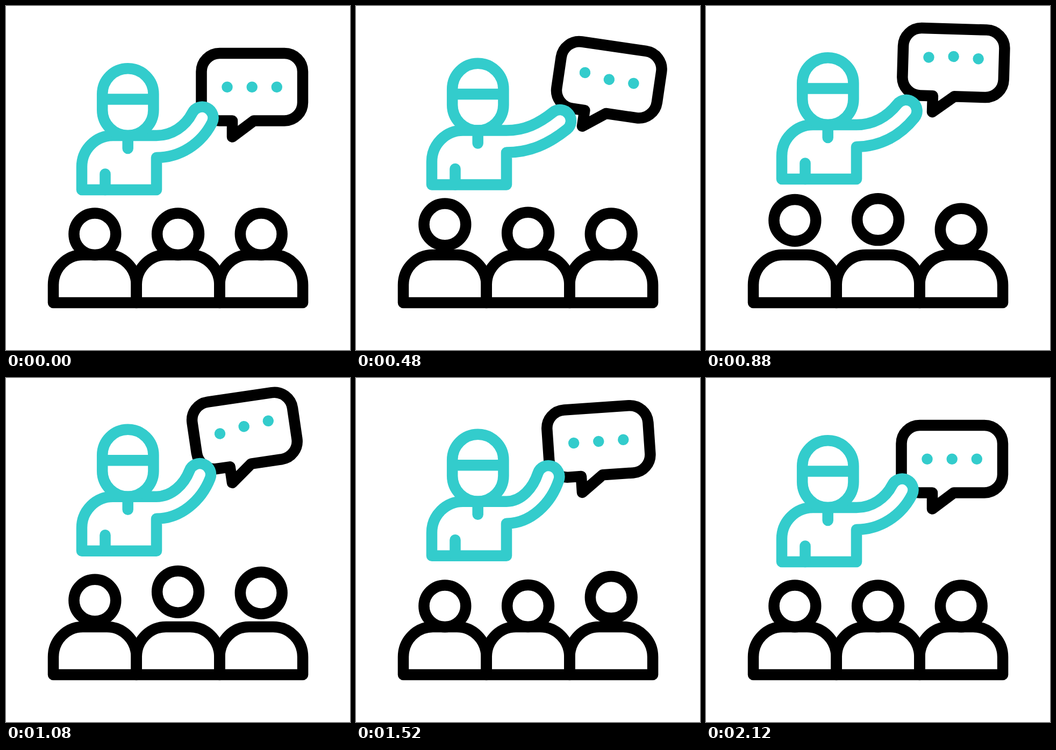
These frames come from a looping animation (640x640 px, 2200 ms). An HTML page:

```html
<!DOCTYPE html>
<html lang="en">
<head>
<meta charset="utf-8">
<title>Lecture</title>
<style>
  html, body { margin: 0; width: 100%; height: 100%; overflow: hidden; background: #fff; }
  svg { display: block; width: 100vw; height: 100vh; }
  .line { fill: none; stroke: #000; stroke-width: 20.5; stroke-linecap: round; stroke-linejoin: round; }
  .teal { stroke: #33cccc; }
  .dot { fill: #33cccc; }
</style>
</head>
<body>
<svg viewBox="0 0 640 640">
  <g id="bubble">
    <path class="line" d="M397.5 88H518a34 34 0 0 1 34 34V179.500a34 34 0 0 1-34 34H461L421 243.500V213.500H397.500a34 34 0 0 1-34-34V122a34 34 0 0 1 34-34Z"/>
    <circle class="dot" cx="411.500" cy="150.700" r="10.250"/>
    <circle class="dot" cx="457.700" cy="150.700" r="10.250"/>
    <circle class="dot" cx="503.800" cy="150.700" r="10.250"/>
  </g>
  <g id="teacher">
    <path id="torso" class="line teal" style="fill:#fff"/>
    <path class="line teal" d="M179.200 163.800a47.600 47.600 0 0 1 95.200 0v29.600a47.600 47.600 0 0 1-95.200 0ZM179.200 173.500h95.200M226.700 241v24M184.500 342v-29.500"/>
  </g>
  <g id="crowd"></g>
</svg>
<script>
const LOOP = 2200, STEP = 40;
const $ = id => document.getElementById(id);
const mix = (a, b, p) => a + (b - a) * p;

// Symmetric ease, cubic-bezier(.5, 0, .5, 1)
function ease(x) {
  let lo = 0, hi = 1;
  for (let i = 0; i < 24; i++) {
    const s = (lo + hi) / 2;
    if (1.5 * s * (1 - s) + s * s * s < x) lo = s; else hi = s;
  }
  return lo * lo * (3 - 2 * lo);
}

// Value at time t on a list of [time, value] keys
function track(t, keys) {
  if (t <= keys[0][0]) return keys[0][1];
  for (let i = 1; i < keys.length; i++) {
    const [t0, a] = keys[i - 1], [t1, b] = keys[i];
    if (t < t1) return mix(a, b, ease((t - t0) / (t1 - t0)));
  }
  return keys[keys.length - 1][1];
}

const hop = (t, mid, half, height) =>
  track(t, [[mid - half, 0], [mid, -height], [mid + half, 0]]);

const TEACHER_Y = [[0, 0], [1000, -20.5], [2100, 0]];
const ARM = [[0, 0], [600, 1], [1340, -1], [2000, 0]];
const BUBBLE_Y = [[0, 0], [1060, -48.5], [2120, 0]];
const BUBBLE_TURN = [[0, 0], [610, 9], [1220, -10], [1760, 0]];
const DOT_MID = [705, 880, 1060];
const HEAD_MID = [740, 967, 1243];

const heads = HEAD_MID.map((_, i) => {
  const x = 88 + i * 154.7;
  const add = (tag, attrs) => {
    const el = document.createElementNS("http://www.w3.org/2000/svg", tag);
    el.setAttribute("class", "line");
    for (const k in attrs) el.setAttribute(k, attrs[k]);
    return $("crowd").appendChild(el);
  };
  add("path", { d: `M${x} 552V519a55 56 0 0 1 55-56h44.7a55 56 0 0 1 55 56V552Z` });
  return add("circle", { cx: x + 77.35, cy: 424.3, r: 38.9 });
});
const dots = document.querySelectorAll(".dot");

// Torso with the raised arm; u runs from -1 (up) to 1 (down)
function torso(u) {
  const [dx, dy, turn] = u > 0 ? [15.5, 16, 26] : [8.2, 15, 10];
  const x = 365 + dx * u, y = 208 + dy * u;
  const a = (27 + turn * u) * Math.PI / 180;
  const sin = Math.sin(a), cos = Math.cos(a), r = 20.5;
  const L = [x - cos * r, y - sin * r], R = [x + cos * r, y + sin * r];
  const ku = 0.36 * Math.hypot(L[0] - 280, L[1] - 241);
  const kl = 0.36 * Math.hypot(R[0] - 280, R[1] - 282);
  return `M141 342V299a58 58 0 0 1 58-58H280` +
    `C${280 + ku} 241 ${L[0] - sin * ku} ${L[1] + cos * ku} ${L}` +
    `A${r} ${r} 0 0 1 ${R}` +
    `C${R[0] - sin * kl} ${R[1] + cos * kl} ${280 + kl} 282 280 282V342Z`;
}

function draw(t) {
  const move = (el, y) => el.setAttribute("transform", `translate(0 ${y})`);
  move($("teacher"), track(t, TEACHER_Y));
  $("torso").setAttribute("d", torso(track(t, ARM)));
  $("bubble").setAttribute("transform",
    `translate(0 ${track(t, BUBBLE_Y)}) rotate(${track(t, BUBBLE_TURN)} 421 243.5)`);
  dots.forEach((el, i) => move(el, hop(t, DOT_MID[i], 490, 11.5)));
  heads.forEach((el, i) => move(el, hop(t, HEAD_MID[i], 605, 28)));
}

const start = performance.now();
function tick() {
  const t = (performance.now() - start) % LOOP;
  draw(Math.floor(t / STEP) * STEP);
  requestAnimationFrame(tick);
}
tick();
</script>
</body>
</html>
```
